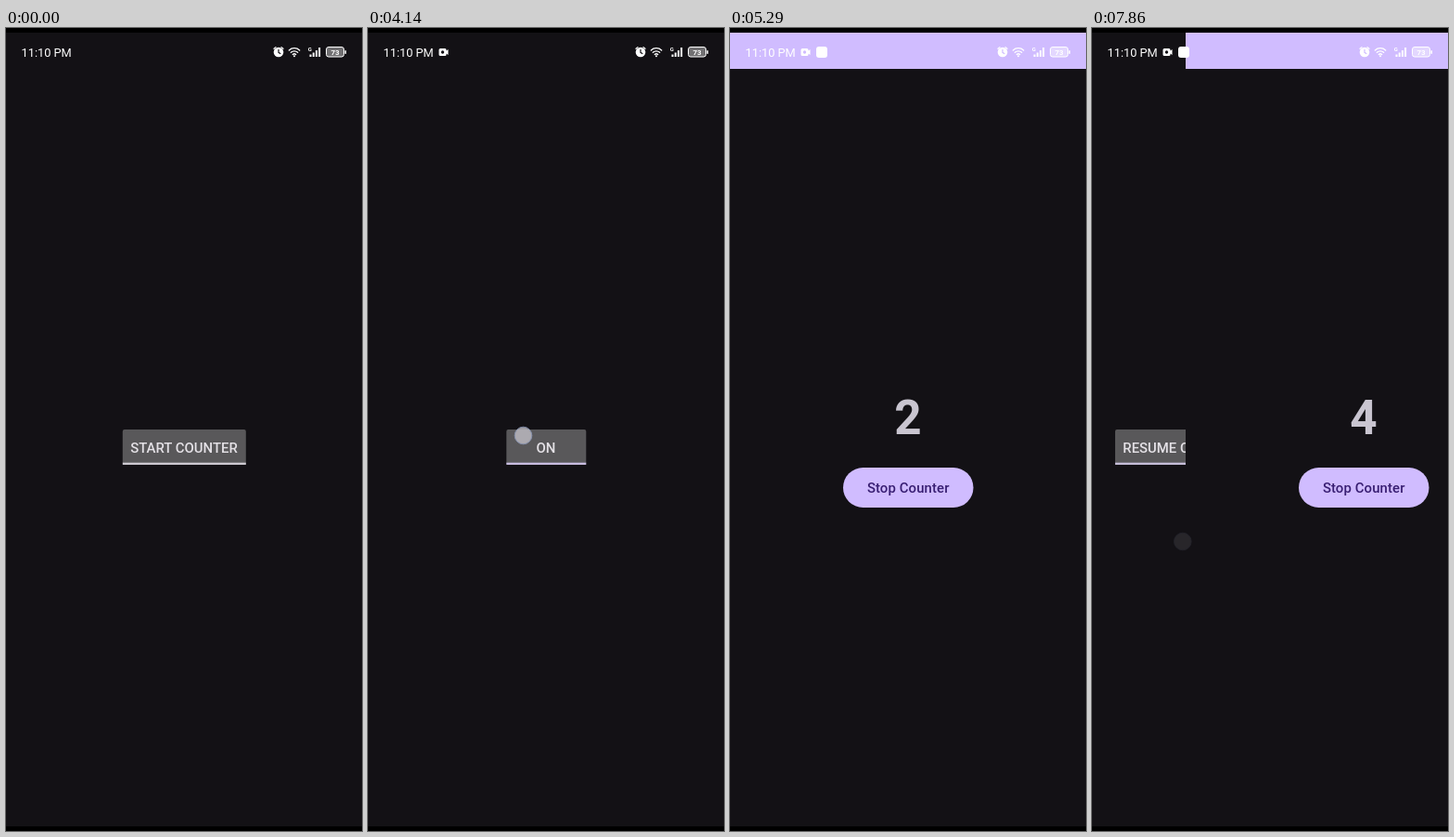
Recreate the animation shown at these times as an HTML page. Size 384x864 px, loop 8 s.

```html
<!DOCTYPE html>
<html lang="en">
<head>
<meta charset="utf-8">
<title>Counter</title>
<style>
  html, body { margin: 0; width: 100%; height: 100%; overflow: hidden; background: #000; }
  svg { display: block; width: 384px; height: 864px; font-family: Roboto, sans-serif; }
  .mid { text-anchor: middle; }
  .label { font-size: 14.93px; font-weight: 500; }
  .line { fill: none; stroke: #fff; stroke-linecap: round; }
</style>
</head>
<body>
<svg viewBox="0 0 384 864">
  <mask id="clock">
    <circle cx="294" cy="26" r="5.3" fill="#fff"/>
    <path d="M294 23v3.3l2.3 1.5" fill="none" stroke="#000" stroke-width="1.2"/>
  </mask>

  <rect y="5" width="384" height="854" fill="#131115"/>
  <g id="home">
    <rect id="button" y="432" height="38" rx="2"/>
    <rect id="underline" y="467.7" height="2.2"/>
    <text id="caption" class="mid label" x="192" y="457" fill="#e4e1e6"></text>
  </g>

  <g id="page">
    <rect y="5" width="384" height="854" fill="#131115"/>
    <rect y="5" width="384" height="39" fill="#d0bcff"/>
    <text id="count" class="mid" x="192" y="437.3" font-size="51.2" font-weight="700" fill="#c9c5d0"></text>
    <rect x="122" y="473" width="140.5" height="43" rx="21.5" fill="#d0bcff"/>
    <text class="mid label" x="192.2" y="500" fill="#381e72" letter-spacing=".1">Stop Counter</text>
  </g>

  <g id="status" fill="#fff">
    <text x="16.5" y="31" font-size="12.8">11:10 PM</text>
    <path id="camera" fill-rule="evenodd" d="M78 22h5q1.500 0 1.500 1.500v1l2-1.500v6l-2-1.500v1q0 1.500-1.500 1.500h-5q-1.500 0-1.500-1.500v-5q0-1.500 1.500-1.500zM80.500 24.300a1.700 1.700 0 1 0 .01 0z"/>
    <rect id="app" x="93" y="20" width="12" height="12" rx="3"/>
    <rect x="288" y="20" width="12" height="12" mask="url(#clock)"/>
    <path class="line" d="M289 22.300l2-1.700M299 22.300l-2-1.700" stroke-width="1.200"/>
    <path class="line" d="M305.300 24A8.200 8.200 0 0 1 316.700 24M307.300 26.300A5.300 5.300 0 0 1 314.700 26.300M309.300 28.500A2.500 2.500 0 0 1 312.700 28.500" stroke-width="1.300"/>
    <circle cx="311" cy="30.300" r="1"/>
    <text x="325.700" y="25" font-size="6" font-weight="700">G</text>
    <path d="M327.500 31v-2.500h2v2.500zM330.700 31v-4.500h2v4.500zM333.900 31v-7h2v7zM337.100 31v-10h2v10z"/>
    <rect x="345.500" y="20.500" width="19" height="10.500" rx="2.500" fill="#fff" fill-opacity=".4" stroke="#fff"/>
    <rect x="365.500" y="24" width="1.500" height="4" rx=".7"/>
    <text class="mid" x="355" y="28.700" font-size="8" font-weight="700">73</text>
  </g>

  <g id="back">
    <path d="M0 447C0 487 20 497 20 527S0 567 0 607z" fill="#000"/>
    <path class="line" d="M11 522l-4.500 5 4.500 5" stroke-width="1.500"/>
  </g>
  <circle id="touch" r="9.300" fill="#bfbdc4" stroke="#8f9cbd"/>
  <path d="M0 0h384v5H0zM0 859h384v5H0z"/>
</svg>
<script>
const $ = id => document.getElementById(id);
const put = (id, attrs) => {
  for (const name in attrs) $(id).setAttribute(name, attrs[name]);
};

// Each entry is [start time, value]; values hold until the next entry.
const pageX = [[0, 384], [4290, 369], [4430, 57], [4570, 0], [7860, 101]];
const touches = [[0, null], [4140, [167.5, 438.5, .82]], [4290, null],
  [7570, [10.5, 527.5, .82]], [7710, [97.8, 552.5, .82]], [7860, [97.8, 552.5, .12]]];
const cameraAlpha = [[0, 0], [140, .5], [290, 1]];
const buttons = [
  [0, ["START COUNTER", 133, "#59585a", "#d0ccd4"]],
  [4140, ["ON", 86, "#59585a", "#cbbfe4"]],
  [4290, ["ON", 86, "#69686a", "#cbbfe4"]],
  [4570, ["RESUME COUNTER", 146, "#59585a", "#c9c0dc"]]
];
const at = (track, t) => track.findLast(([start]) => t >= start)[1];

function draw(now) {
  const t = now % 8000;
  const x = at(pageX, t);
  const [caption, width, fill, accent] = at(buttons, t);
  const left = 192.3 - width / 2;
  put("home", { transform: `translate(${(x - 384) / 3})` });
  put("button", { x: left, width, fill });
  put("underline", { x: left, width, fill: accent });
  $("caption").textContent = caption;

  put("page", { transform: `translate(${x})` });
  $("count").textContent = t < 5290 ? 1 : Math.min(4, 2 + Math.floor((t - 5290) / 1000));

  put("camera", { opacity: at(cameraAlpha, t) });
  put("app", { opacity: t >= 4710 ? 1 : 0 });
  put("back", { opacity: t >= 7710 && t < 7860 ? 1 : 0 });
  const [cx, cy, opacity] = at(touches, t) || [0, 0, 0];
  put("touch", { cx, cy, opacity });
  requestAnimationFrame(loop);
}
const began = performance.now();
const loop = () => draw(performance.now() - began);
loop();
</script>
</body>
</html>
```
